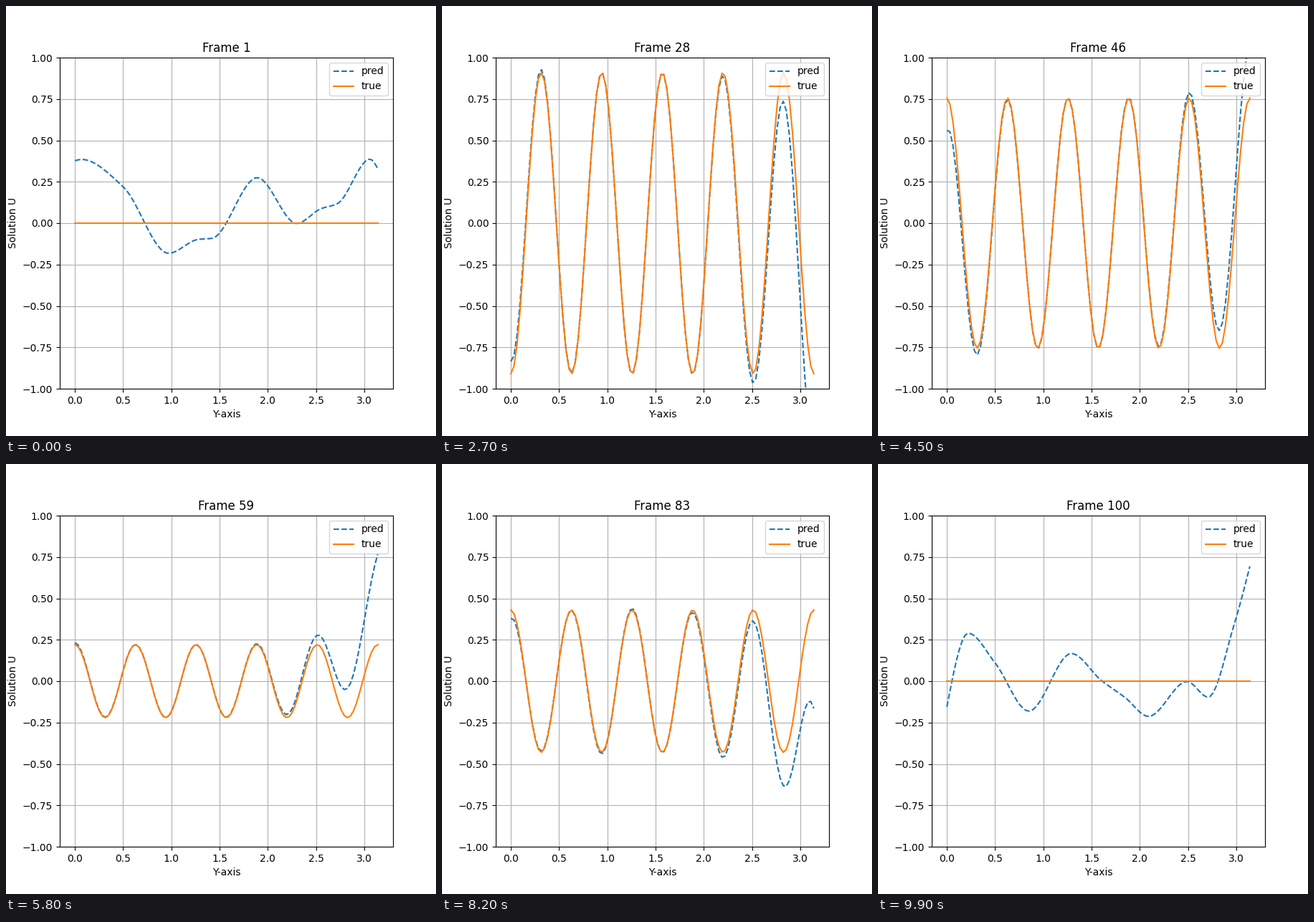
Write a matplotlib script that moves like this. It is 600 px wide and 600 px high and loops after 10 s.

```python
import numpy as np
import matplotlib.pyplot as plt
from matplotlib.animation import FuncAnimation

FRAMES = 100
FADE = 6            # steps over which the first and last ripple die out
y = np.linspace(0, np.pi, 100)
steps = np.arange(FRAMES)


def smooth(x, v, at):
    """Cubic curve through key points without overshoot."""
    x, v = np.array(x, float), np.array(v, float)
    h = np.diff(x)
    d = np.diff(v) / h
    w0, w1 = 2 * h[1:] + h[:-1], h[1:] + 2 * h[:-1]
    inner = np.where(d[:-1] * d[1:] > 0,
                     (w0 + w1) / (w0 / d[:-1] + w1 / d[1:]), 0)
    m = np.concatenate([[1.5 * d[0] - inner[0] / 2], inner,
                        [1.5 * d[-1] - inner[-1] / 2]])
    k = np.clip(np.searchsorted(x, at, side="right") - 1, 0, len(h) - 1)
    t = (at - x[k]) / h[k]
    return (v[k] + (v[k + 1] - v[k]) * t * t * (3 - 2 * t)
            + h[k] * t * (1 - t) * (m[k] * (1 - t) - m[k + 1] * t))


# Ripples of the prediction at both ends of time
first = smooth([0, .07, .5, .97, 1.28, 1.42, 1.89, 2.3, 2.55, 2.72, 3.06, 3.14],
               [.377, .385, .22, -.182, -.098, -.092, .275, -.002, .087, .117,
                .387, .33], y)
last = smooth([0, .22, .5, .85, 1.29, 1.6, 1.85, 2.09, 2.49, 2.71, 2.98, 3.14],
              [-.155, .29, .11, -.181, .167, .005, -.1, -.213, -.002, -.097,
               .345, .69], y)

# Errors at the two borders over time, decaying into the domain
keys = [0, 11, 27, 45, 58, 82, 99]
left = smooth(keys, [0, -.353, .07, -.195, .012, -.041, 0], steps)
right = smooth(keys, [0, -.426, -.55, .335, .55, -.636, 0], steps)
left_decay = np.exp(-5 * y)
right_decay = np.exp(-3.6 * (np.pi - y))


def exact(i):
    return np.sin(5 * np.pi * i / (FRAMES - 1)) * np.cos(10 * y)


def error(i):
    return (first * np.exp(-i / FADE)
            + last * np.exp(-(FRAMES - 1 - i) / FADE)
            + left[i] * left_decay + right[i] * right_decay)


fig, ax = plt.subplots(figsize=(6, 6), dpi=100)
pred, = ax.plot(y, 0 * y, "--", label="pred")
true, = ax.plot(y, 0 * y, label="true")
ax.set_ylim(-1, 1)
ax.set_xlabel("Y-axis")
ax.set_ylabel("Solution U")
ax.grid(True)
ax.legend(loc="upper right")
title = ax.set_title("Frame 1")


def update(i):
    true.set_ydata(exact(i))
    pred.set_ydata(exact(i) + error(i))
    title.set_text(f"Frame {i + 1}")
    return pred, true, title


anim = FuncAnimation(fig, update, frames=FRAMES, interval=100, repeat=True)
plt.show()
```
